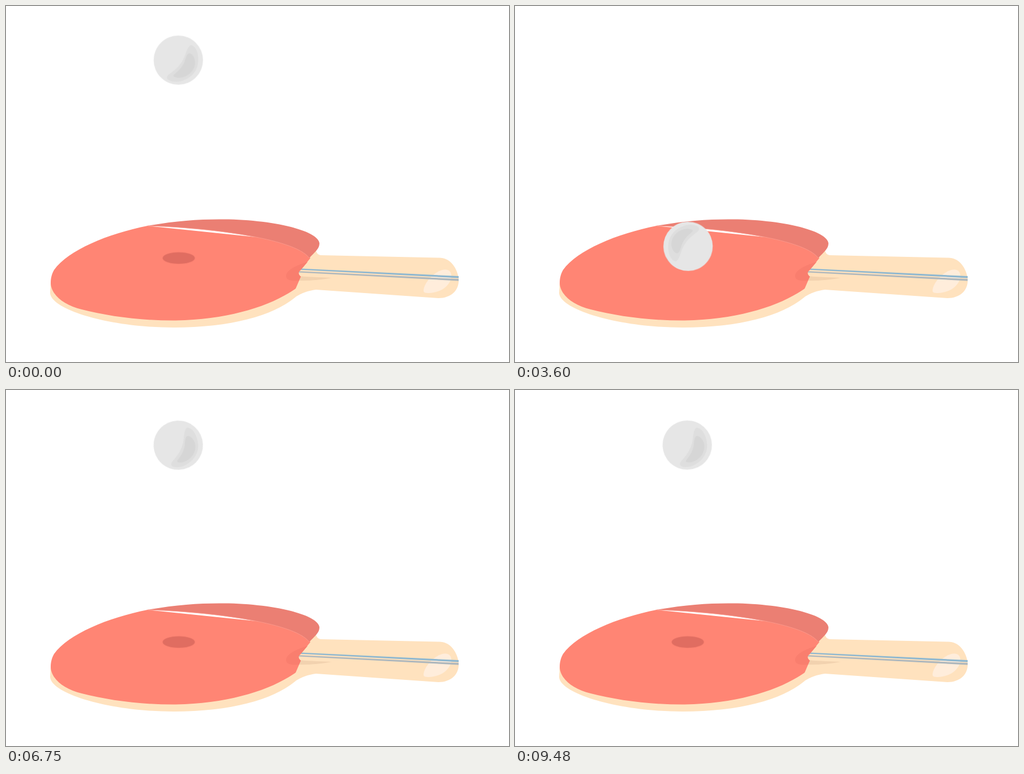
Animation of 889x630 px, one loop 9570 ms. Source, as an HTML page:

```html
<!DOCTYPE html>
<html lang="en">
<head>
<meta charset="utf-8">
<title>Bouncing ball</title>
<style>
  html, body { margin: 0; width: 100%; height: 100%; overflow: hidden; background: #fff; }
  svg { display: block; width: 889px; height: 630px; }

  /* The clock below sets the time of these paused animations. */
  .fall, .spin, .shadow { animation: 909.2ms linear infinite paused; }
  .fall { animation-name: fall; }
  .spin { animation-name: spin; }
  .shadow { animation-name: grow; }

  @keyframes fall {
    0% { transform: translate(305.2px, 96.3px); animation-timing-function: cubic-bezier(.55, 0, .8, .82); }
    50% { transform: translate(305.2px, 426.3px); animation-timing-function: cubic-bezier(.2, .18, .45, 1); }
    100% { transform: translate(305.2px, 96.3px); }
  }
  @keyframes spin {
    from { transform: rotate(0deg); }
    to { transform: rotate(360deg); }
  }
  @keyframes grow {
    0% { transform: translate(305.3px, 446px) scale(.765); animation-timing-function: cubic-bezier(.55, 0, .8, .82); }
    50% { transform: translate(305.3px, 446px) scale(1); animation-timing-function: cubic-bezier(.2, .18, .45, 1); }
    100% { transform: translate(305.3px, 446px) scale(.765); }
  }
</style>
</head>
<body>
<svg viewBox="0 0 889 630">
  <!-- wood -->
  <path fill="#ffe2be" d="M79 488L78 508C80 538 185 569 296 569C400 569 475 547 513 514C527 506 535 504 548 502L764 517C785 517 799 505 800 488V481C796 460 783 445 765 445.5L556 441C551 440 549 437 548 433L500 440Z"/>
  <path fill="#ffeddb" d="M738 504C738 490 758 468 775 466.5C784 466 788 472 787 480C785 496 766 508 747 508C741 508 738 507 738 504Z"/>
  <path fill="#f2d2af" d="M519 478C540 480 560 480 576 481C556 485 536 486.500 516 486Z"/>
  <path fill="#8fb8d0" d="M519 464.500L800 478V481.500L519 466.700Z"/>
  <path fill="#afb8bd" d="M517 469.300L800 483V486.500L517 471.500Z"/>

  <!-- rubber -->
  <path fill="#ff8574" d="M250 389C180 403 110 432 85 467C79 477 78 490 80 497C85 515 105 530 134 537C180 549 240 557 300 556.500C395 555 470 530 512 500L521 479C516 474 516 471 521 467L538 446L500 415Z"/>
  <path fill="#f97e6e" d="M533 453C515 458 495 467 495 478C496 486 505 487 517.500 486L521 479C516 474 516 471 521 467Z"/>
  <path fill="#eb7f73" d="M250 389C300 380 345 377 385 377.500C470 378 552 397 554 420C554 430 545 436 536 446C510 410 350 392 250 389Z"/>
  <path fill="none" stroke="#ff9d90" stroke-width=".8" d="M250 389C350 392 510 410 536 446"/>

  <ellipse class="shadow" rx="37.25" ry="13.400" fill="#e06d61"/>

  <g class="fall">
    <g class="spin">
      <g transform="translate(-.65 -.5)">
        <circle r="43.600" fill="#e6e6e6"/>
        <path fill="#dedede" d="M24 -26C32 -23 36 -10 35 2C34 20 22 34 0 38C-12 39 -21 35 -20 30C-19 25 -8 21 2 9C13 -4 13 -17 19 -24C20.500 -26 22 -26.500 24 -26Z"/>
        <path fill="#d6d6d6" d="M20 -12C27 -10 31 0 29 9C26 23 12 32 -2 31C-8 30 -10 28 -8 26C-2 21 6 15 11 3C14 -5 15 -12 20 -12Z"/>
      </g>
    </g>
  </g>
</svg>
<script>
  const LOOP = 9570, STEP = 30, LAST = 302;
  const SLOW_STEP = 100, SLOW_COUNT = 6;
  const slowEnd = SLOW_STEP * SLOW_COUNT;
  const animations = document.getAnimations();

  // The loop opens with a few long steps, then runs evenly.
  function stepAt(t) {
    if (t < slowEnd) return Math.floor(t / SLOW_STEP);
    return Math.min(LAST, SLOW_COUNT + Math.floor((t - slowEnd) / STEP));
  }

  function draw() {
    const time = stepAt(performance.now() % LOOP) * STEP;
    for (const a of animations) a.currentTime = time;
    requestAnimationFrame(draw);
  }
  draw();
</script>
</body>
</html>
```
